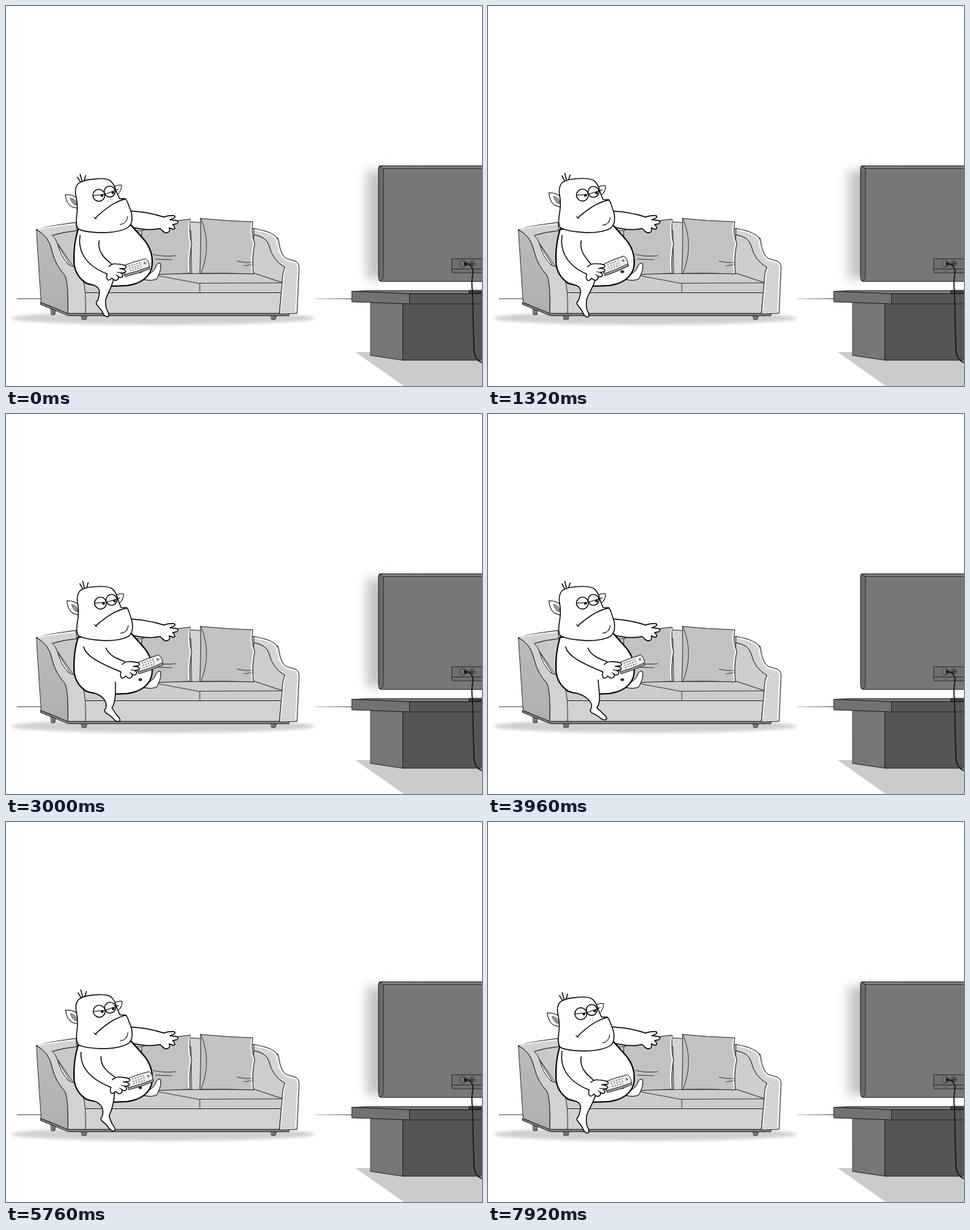
Recreate the animation shown at these times as an HTML page. Size 700 by 560 pixels, loop 8000 ms.

```html
<!DOCTYPE html>
<html lang="en">
<head>
<meta charset="utf-8">
<title>Evening on the sofa</title>
<style>
  html, body { margin: 0; width: 100%; height: 100%; overflow: hidden; background: #fff; }
  svg { display: block; width: 700px; height: 560px; }
  .ink { stroke: #1c1c1c; stroke-width: .9; stroke-linejoin: round; stroke-linecap: round; }
  .no { fill: none; }
  .skin { fill: #fff; stroke: #000; stroke-width: 1.4; stroke-linejoin: round; stroke-linecap: round; }
  .bold { stroke-width: 2; }
  .thin { stroke-width: 1; }
  .line { fill: none; }
  .shine { fill: none; stroke: #fff; stroke-width: 1.4; stroke-linecap: round; }
</style>
</head>
<body>
<svg viewBox="0 0 700 560">
  <defs>
    <filter id="soft" x="-20%" y="-60%" width="140%" height="220%"><feGaussianBlur stdDeviation="2"/></filter>
    <filter id="haze" x="-60%" y="-30%" width="220%" height="160%"><feGaussianBlur stdDeviation="8"/></filter>
    <linearGradient id="side" x1="0" y1="0" x2="0" y2="1">
      <stop offset="0" stop-color="#bababa"/><stop offset="1" stop-color="#b0b0b0"/>
    </linearGradient>
    <linearGradient id="fade"><stop offset="0" stop-color="#ccc"/><stop offset="1" stop-color="#444"/></linearGradient>
  </defs>

  <!-- floor -->
  <path d="M16 431.5H52" stroke="#555"/>
  <rect x="454" y="431" width="56" height="1" fill="url(#fade)"/>
  <ellipse cx="231" cy="460" rx="223" ry="10" fill="#d0d0d0" filter="url(#soft)"/>
  <path d="M514 510H540L584 522H700V560H585Z" fill="#cbcbcb"/>

  <!-- sofa -->
  <g class="ink">
    <path fill="#777" stroke-width=".7" d="M66 446h7l-1 9h-5zM111 456h8l-1 6h-6zM390 456h8l-2 6h-5z"/>
    <path fill="#888" d="M51 437L92 453H416V456.500H92L51 440Z"/>
    <path fill="#d3d3d3" d="M45 330Q60 325 103 319L200 314L285 319L365 328L400 342L408 408H110L68 338Z"/>
    <path fill="#c9c9c9" stroke-width=".8" d="M68 338Q84 333 104 331H272L273 395L112 402Z"/>
    <path fill="#cecece" stroke-width=".8" d="M365 337Q383 340 387 353Q392 375 410 385L407 408L362 393Z"/>
    <path fill="#cdcdcd" stroke-width=".8" d="M113 395L366 394L407 408L405 423H115Z"/>
    <path fill="#d2d2d2" d="M115 422.500H405L402 453H115Z"/>
    <path class="no" stroke-width=".8" d="M116 409H148M205 394L285 409V421M285 408.500L405 408"/>
    <path fill="#d4d4d4" d="M365 328Q397 333 401 346Q404 367 412 372L426 376Q432 379 431 389L428 453L402 454L406 408Q406 394 410 385Q392 375 387 353Q383 340 365 337Z"/>
    <path fill="#c2c2c2" d="M200 331Q235 317 271 314Q269 335 273 350Q269 375 271 394Q235 395 200 397Z"/>
    <path fill="#c2c2c2" d="M286 313Q325 317 363 318Q360 335 366 350Q361 374 364 395Q323 393 285 394Q287 350 286 313Z"/>
    <path class="no" stroke-width=".8" d="M287 314Q303 353 287 393M340 376Q351 379 363 378M350 383L363 381M217 366Q231 370 250 368M220 373L244 374"/>
    <path fill="url(#side)" d="M45 330Q63 338 68 362Q73 382 86 396Q92 404 91 453L52 437Z"/>
    <path fill="#d2d2d2" d="M45 330Q63 338 68 362Q73 382 86 396Q92 404 91 453H117Q118 419 113 402Q109 387 92 381Q81 370 76 351Q73 342 68 338Q84 333 104 331L103 319Q55 325 45 330Z"/>
  </g>
  <g class="shine">
    <path d="M48 329Q64 325 101 321M366 330Q395 335 398 346Q402 369 411 374L425 378Q429 380 429 389L426 450"/>
    <path d="M270 317Q267 336 271 350Q267 374 269 392M361 320Q358 336 364 350Q359 374 362 393"/>
    <path stroke-width="1" d="M404 449L408 408Q408 394 412 386"/>
  </g>

  <!-- character -->
  <path class="skin thin" d="M205 398Q219 392 221 382Q223 378 227 379Q230 386 222 402Q214 406 203 403Z"/>
  <path class="skin" d="M182 302Q207 303 232 311Q241 308 247 309Q252 311 241 315L250 316Q256 318 251 321L245 322Q251 328 246 329L240 327Q242 333 237 334Q233 335 230 331L227 328Q207 332 182 325"/>
  <path class="skin bold" d="M106 329Q99 352 100 377Q101 398 119 409L128 411Q150 414 178 412Q207 408 214 387Q219 361 200 341L183 322Z"/>
  <ellipse cx="197.500" cy="391.500" rx="2.200" ry="1.600" fill="#333" stroke="#000"/>
  <path id="leg" class="skin"/>
  <g id="head">
    <path class="skin thin" d="M105 283Q97 277 87 278Q89 292 97 296L105 298M159 266Q165 263 170 264Q170 272 165 277"/>
    <path fill="#999" stroke="#333" stroke-width=".7" d="M94 283Q103 284 104 293Q99 295 94 283Z"/>
    <path class="skin line" d="M111 262L105 252M113 262L109 248M114 262L117 250"/>
    <path class="skin" stroke-width="1.800" d="M103 281Q100 267 107 261Q115 256 130 255Q148 253 154 258Q160 264 162 273L167 284L175 284Q178 286 179 290L184 303Q188 319 180 326Q169 333 146 334Q118 334 107 329Q102 325 104 308Q106 294 103 281Z"/>
    <path class="skin line" d="M131 313Q143 301 157 292Q166 287 176 284"/>
    <path class="skin line thin" d="M129 311L133 314M168 322Q178 321 179 310"/>
    <g class="skin" stroke-width="1.900"><circle cx="136.500" cy="279" r="8.800"/><circle cx="152.500" cy="273.500" r="8"/></g>
    <path class="skin line thin" d="M128 279.500L145 277.500L160 272L165 270"/>
    <circle cx="141" cy="279.500" r="2"/><circle cx="157" cy="275" r="2"/>
    <path fill="none" stroke="#333" stroke-linecap="round" d="M150 287.500h.1M153.500 285.500h.1M154 289h.1"/>
  </g>
  <path id="armFill" fill="#fff"/>
  <path id="armLine" class="skin line"/>
  <g id="grip">
    <g transform="translate(30 -9) rotate(-18)">
      <path class="ink" stroke-width=".8" fill="#aaa" d="M-18 4L20 3L20 8Q0 10 -18 9Z"/>
      <path class="ink" stroke-width=".8" fill="#ececec" d="M-18 -7Q0 -9 18 -8Q22 -3 20 5Q0 7 -18 6Z"/>
      <path fill="none" stroke="#555" stroke-width="1.300" stroke-dasharray="1.600 2.400" d="M-9 -4.500H10M-9 -1H10M-9 2.500H8"/>
      <circle cx="15" cy="-2" r="1.400" fill="#888" stroke="#333" stroke-width=".5"/>
    </g>
    <path class="skin" d="M-9 -9Q-4 -14 2 -13Q10 -13 15 -11Q18 -9 15 -7L7 -6Q14 -6 16 -3Q17 0 9 0Q14 3 11 6Q8 8 5 5Q7 9 3 11Q-1 12 -4 8Q-7 12 -10 11Q-13 8 -11 2"/>
    <path class="skin line thin" d="M9 0L4 -1M5 5L2 3"/>
  </g>

  <!-- television -->
  <rect id="glow" x="530" y="242" width="60" height="160" fill="#c4c4c4" filter="url(#haze)"/>
  <path d="M548 406H700V420H548Z" fill="#fff"/>
  <g class="ink">
    <path fill="#777" d="M551 235.500H701V406H551Q547.500 403 548 396V239Q548 235.500 551 235.500Z"/>
    <path fill="#808080" stroke-width=".7" d="M550 235.500H701V239.500H555Z"/>
    <path fill="#6a6a6a" stroke-width=".8" d="M549 236Q555 237 555 242V399Q554 405 549 405Q547.500 402 548 396V239Z"/>
    <path fill="#707070" stroke-width=".8" d="M656 372.500H701V393H656ZM656 387.500H701"/>
    <circle cx="672" cy="380" r="4.500" fill="#777"/>
    <circle cx="685" cy="380" r="4" fill="#777"/>
    <circle cx="685" cy="380" r="1.700" fill="#444"/>

    <!-- stand -->
    <path fill="#777" d="M536.500 436L584 438V522L536.500 515Z"/>
    <path fill="#555" d="M584 438H701V522H584Z"/>
    <path fill="#808080" d="M509 420.500L532 419.500H701V424H594Z"/>
    <path fill="#727272" d="M509 420.500L594 424V439L509 436Z"/>
    <path fill="#565656" d="M594 424H701V439H594Z"/>
    <path fill="#444" d="M681 419H701V423H681Z"/>
    <path class="no" stroke-width="1.800" d="M675 380Q685 379 687 392Q684 405 686 421L688 503Q688 522 701 526"/>
    <circle cx="676" cy="380" r="2.500" fill="#222"/>
  </g>
</svg>
<script>
  const LOOP = 8000, STEP = 120;
  const $ = id => document.getElementById(id);
  const mix = (a, b, k) => a + (b - a) * k;

  // smooth rise from 0 to 1 between two times
  function ease(t, from, to) {
    const u = Math.min(1, Math.max(0, (t - from) / (to - from)));
    return u * u * (3 - 2 * u);
  }
  const pulse = (t, up, top, fall, end) => ease(t, up, top) - ease(t, fall, end);

  function drawArm(x, y, k) {
    const at = (ax, ay, bx, by) => `${mix(ax, bx, k)} ${mix(ay, by, k)}`;
    const outer = `M${at(109, 338, 114, 343)}C${at(106, 355, 117, 355)} ${at(111, 380, 132, 365)} ${x - 11} ${y + 2}`;
    const bend = `${at(145, 372, 165, 361)} ${at(134, 362, 152, 357)} ${at(137, 346, 147, 345)}`;
    const wrist = `${x - 5} ${y - 13}`;
    $("armFill").setAttribute("d", `${outer}L${wrist}C${bend}Z`);
    $("armLine").setAttribute("d", `${outer}M${wrist}C${bend}`);
  }

  // the foot hangs from the heel and lifts as the leg swings out
  function drawLeg(k) {
    const x = mix(132, 151, k), y = 436, r = mix(54, 29, k) * Math.PI / 180;
    const at = (u, v) => `${x + u * Math.cos(r) - v * Math.sin(r)} ${y + u * Math.sin(r) + v * Math.cos(r)}`;
    $("leg").setAttribute("d",
      `M122 410C142 412 ${x + 4} 424 ${x + 1} ${y - 2}` +
      `Q${at(-2, 2)} ${at(4, 3)}Q${at(14, 2)} ${at(20, 4)}` +
      `Q${at(27, 4)} ${at(27, 0)}Q${at(25, -3)} ${at(18, -4)}Q${at(12, -6)} ${x + 13 - 4 * k} ${y - 3}` +
      `C${x + 15} 425 ${mix(154, 164, k)} 416 ${mix(158, 162, k)} ${mix(403, 392, k)}`);
  }

  function draw(t) {
    const lift = pulse(t, 1400, 2700, 4900, 6200);
    const turn = 2.7 * pulse(t, 0, 1200, 4900, 6200);
    const nudge = pulse(t, 0, 900, 1400, 2000);
    const swing = pulse(t, 1300, 3900, 4900, 6500) + .1 * (1 - ease(t, 0, 840));
    const drop = 3.5 * ease(t, 7700, 7920);
    const x = mix(160, 180, lift) - 4 * nudge, y = mix(393, 378, lift);
    $("head").setAttribute("transform", `translate(0 ${drop}) rotate(${turn} 145 330)`);
    $("grip").setAttribute("transform", `translate(${x} ${y}) rotate(${2 - 3 * lift - 5 * nudge})`);
    $("glow").style.visibility = t >= 3840 && t < 4920 ? "hidden" : "visible";
    drawArm(x, y, lift);
    drawLeg(swing);
  }

  function tick() {
    const t = performance.now() % LOOP;
    draw(Math.floor(t / STEP) * STEP);
    requestAnimationFrame(tick);
  }
  tick();
</script>
</body>
</html>
```
